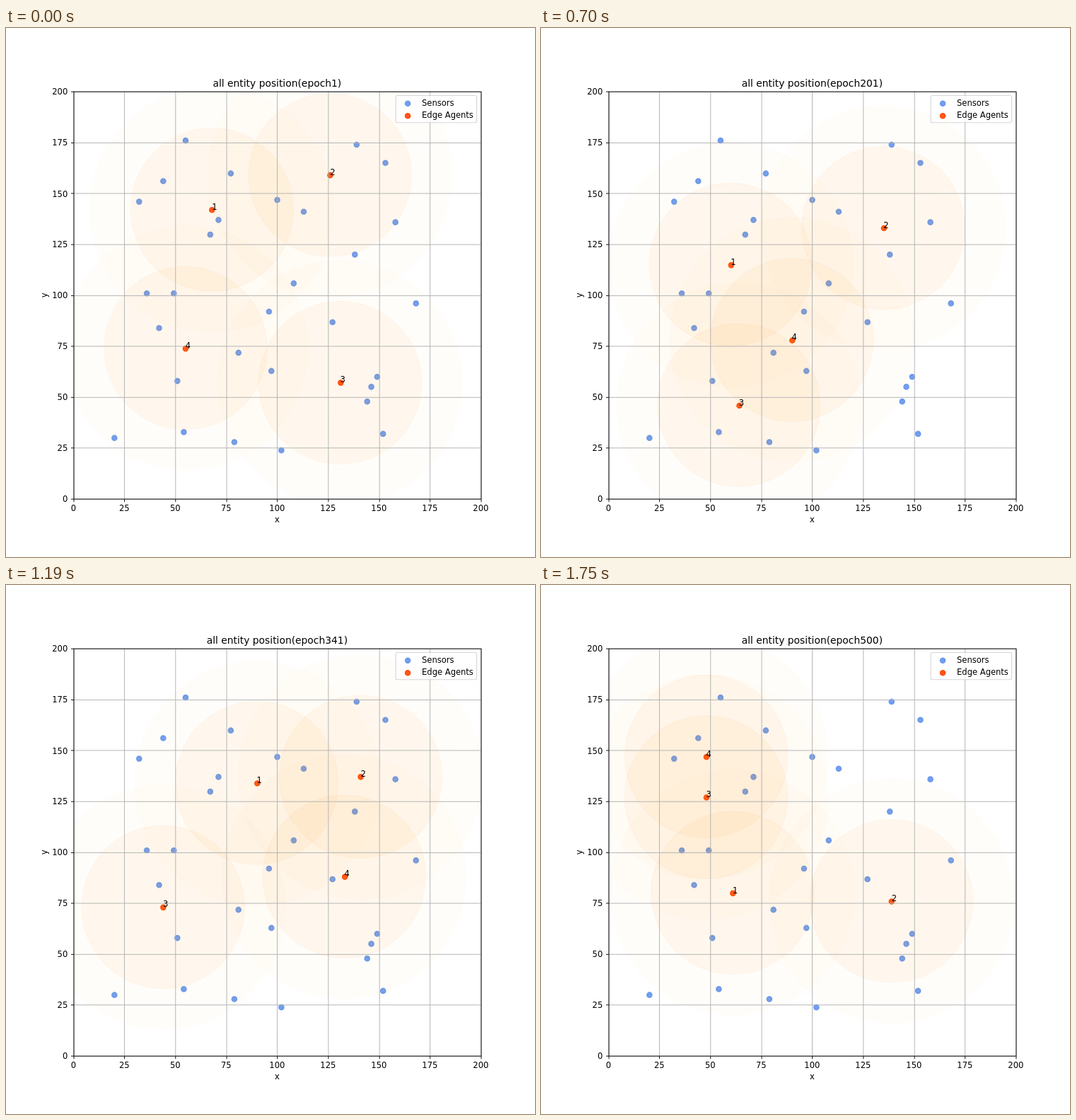
An HTML page with a canvas for the animation above (1820 ms loop, 748 by 748 pixels).

```html
<!DOCTYPE html>
<html lang="en">
<head>
<meta charset="utf-8">
<title>Entity positions</title>
<style>
  html, body { margin: 0; width: 100%; height: 100%; overflow: hidden; background: #fff; }
  canvas { display: block; width: 100vw; height: 100vh; }
</style>
</head>
<body>
<canvas id="plot" width="748" height="748"></canvas>
<script>
const ctx = document.getElementById('plot').getContext('2d');
const STEP = 70, STEPS = 26;

// Layout in a 900-unit figure at 100 dpi, scaled down to the stage
const FIG = 900, PT = 100 / 72, FONT = 10 * PT;
const SPAN = 0.77 * FIG, UNIT = SPAN / 200;
const MID_X = 0.5125 * FIG, LEFT = MID_X - SPAN / 2, RIGHT = LEFT + SPAN;
const BOTTOM = 0.89 * FIG, TOP = BOTTOM - SPAN;
const BLUE = 'rgba(100,149,237,.9)', RED = 'rgba(255,69,0,.9)';
const GRID = '#b0b0b0', INK = '#000';

// Key points of each agent's walk, reached at the steps in keySteps
const keySteps = [0, 4, 7, 13, 17, 22, 25];
const walks = [
  [[68, 142], [38, 92], [51, 98], [68, 131], [90, 134], [40, 33], [61, 80]],
  [[126, 159], [154, 93], [145, 123], [125, 142], [141, 137], [165, 154], [139, 76]],
  [[131, 57], [70, 57], [65, 50], [62, 42], [44, 73], [45, 60], [48, 127]],
  [[55, 74], [47, 87], [53, 93], [127, 63], [133, 88], [107, 96], [48, 147]]
];

const px = x => LEFT + x * UNIT;
const py = y => BOTTOM - y * UNIT;
const snap = v => Math.floor(v + 0.5) + 0.5;

function seeded(seed) {
  return () => (seed = (seed * 16807) % 2147483647) / 2147483647;
}

// One sensor at a random place in each cell of a 6 by 5 grid
function scatterSensors() {
  const rand = seeded(2024), cols = 6, rows = 5;
  return Array.from({ length: cols * rows }, (_, i) => [
    Math.round(20 + (i % cols + rand()) * 152 / cols),
    Math.round(23 + (Math.floor(i / cols) + rand()) * 155 / rows)
  ]);
}
const sensors = scatterSensors();

function agentsAt(step) {
  const next = Math.max(1, keySteps.findIndex(s => s >= step));
  const from = keySteps[next - 1];
  const k = (step - from) / (keySteps[next] - from);
  return walks.map(walk => walk[next - 1].map(
    (v, axis) => Math.round(v + (walk[next][axis] - v) * k)));
}

function disc(x, y, r, color, edge) {
  ctx.beginPath();
  ctx.arc(x, y, r, 0, 2 * Math.PI);
  ctx.fillStyle = ctx.strokeStyle = color;
  ctx.lineWidth = edge * PT;
  ctx.fill();
  ctx.stroke();
}

const dot = (x, y, color) => disc(snap(x), snap(y), 3 * PT, color, 1.5);

function line(x1, y1, x2, y2, color) {
  ctx.beginPath();
  ctx.moveTo(x1, y1);
  ctx.lineTo(x2, y2);
  ctx.strokeStyle = color;
  ctx.lineWidth = 0.8 * PT;
  ctx.stroke();
}

function label(text, x, y, align = 'center', size = FONT) {
  ctx.font = size + 'px "DejaVu Sans", sans-serif';
  ctx.textAlign = align;
  ctx.fillStyle = INK;
  ctx.fillText(text, x, Math.round(y));
}

function eachTick(visit) {
  for (let v = 0; v <= 200; v += 25) visit(v, snap(px(v)), snap(py(v)));
}

function drawAxes() {
  const x0 = snap(LEFT), y0 = snap(BOTTOM), tick = 3.5 * PT;
  eachTick((v, x, y) => {
    line(x, TOP, x, BOTTOM, GRID);
    line(LEFT, y, RIGHT, y, GRID);
  });
  eachTick((v, x, y) => {
    line(x, y0, x, y0 + tick, INK);
    line(x0, y, x0 - tick, y, INK);
    label(v, px(v), BOTTOM + 21);
    label(v, LEFT - 2 * tick, py(v) + 5.3, 'right');
  });
  ctx.strokeStyle = INK;
  ctx.strokeRect(x0, snap(TOP), snap(RIGHT) - x0, y0 - snap(TOP));
  label('x', MID_X, BOTTOM + 40);
  ctx.save();
  ctx.translate(70, BOTTOM - SPAN / 2);
  ctx.rotate(-Math.PI / 2);
  label('y', 0, 0);
  ctx.restore();
}

function drawLegend() {
  const w = 137.7, h = 46, pad = FONT / 2;
  const x = RIGHT - pad - w, y = TOP + pad;
  ctx.beginPath();
  ctx.roundRect(x, y, w, h, FONT / 5);
  ctx.fillStyle = 'rgba(255,255,255,.8)';
  ctx.strokeStyle = 'rgba(204,204,204,.8)';
  ctx.lineWidth = PT;
  ctx.fill();
  ctx.stroke();
  [['Sensors', BLUE], ['Edge Agents', RED]].forEach(([name, color], i) => {
    dot(x + 1.4 * FONT, y + 13 + i * 21, color);
    label(name, x + 3.2 * FONT, y + 17 + i * 21, 'left');
  });
}

function draw(step) {
  const agents = agentsAt(step);
  const scale = ctx.canvas.width / FIG;
  ctx.setTransform(scale, 0, 0, scale, 0, 0);
  ctx.fillStyle = '#fff';
  ctx.fillRect(0, 0, FIG, FIG);

  ctx.save();
  ctx.beginPath();
  ctx.rect(LEFT, TOP, SPAN, SPAN);
  ctx.clip();
  sensors.forEach(([x, y]) => dot(px(x), py(y), BLUE));
  agents.forEach(([x, y]) => dot(px(x), py(y), RED));
  agents.forEach(([x, y]) => {
    disc(px(x), py(y), 60 * UNIT, 'rgba(255,140,0,.02)', 1);
    disc(px(x), py(y), 40 * UNIT, 'rgba(255,140,0,.05)', 1);
  });
  ctx.restore();

  drawAxes();
  agents.forEach(([x, y], i) => label(i + 1, px(x), py(y), 'left'));
  const epoch = Math.min(1 + 20 * step, 500);
  label(`all entity position(epoch${epoch})`, MID_X, TOP - 6 * PT, 'center', 12 * PT);
  drawLegend();
}

const start = performance.now();
function frame() {
  const elapsed = Math.max(0, performance.now() - start);
  draw(Math.floor(elapsed / STEP) % STEPS);
  requestAnimationFrame(frame);
}
frame();
</script>
</body>
</html>
```
